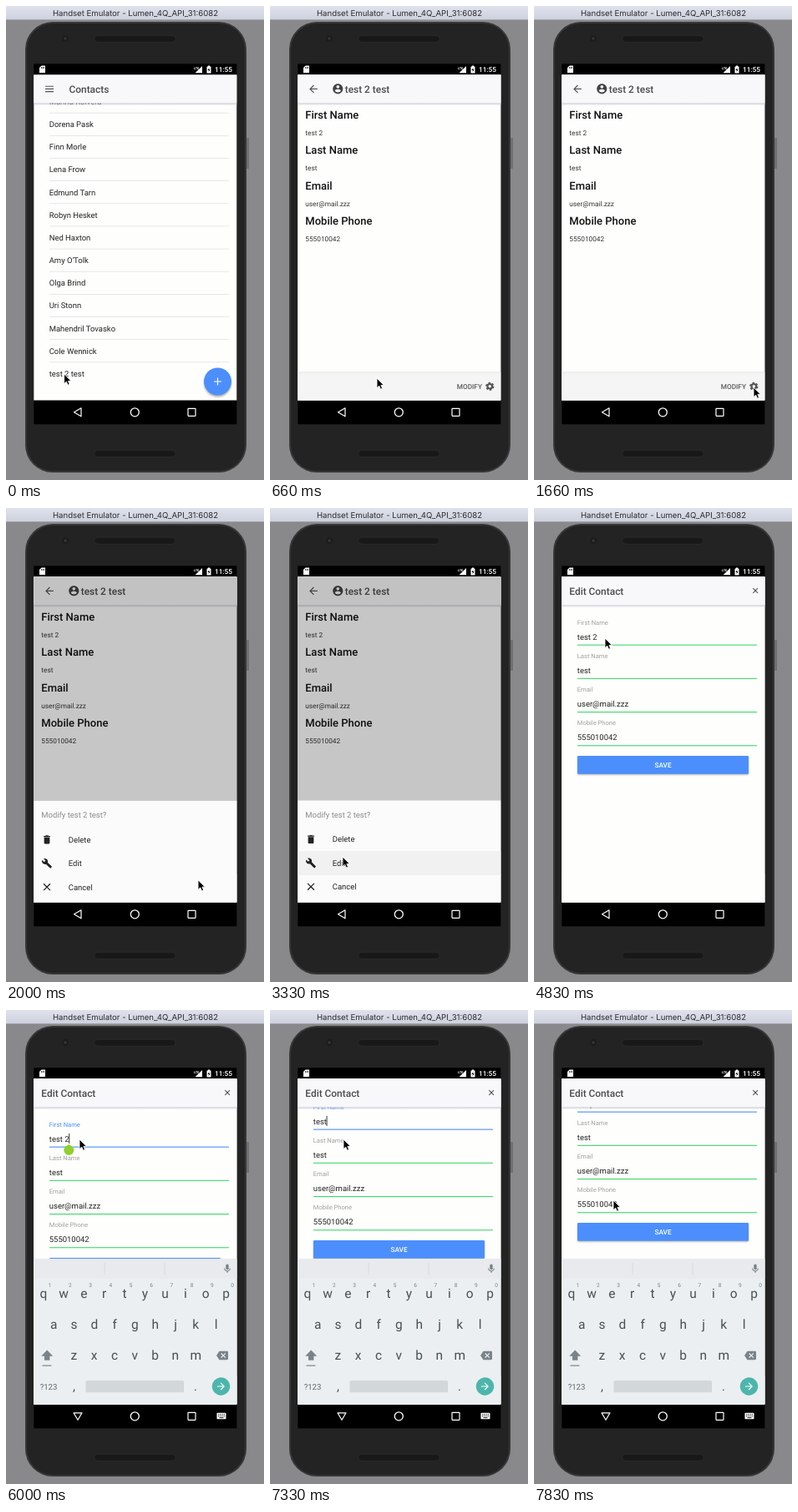
Animation, 309 px wide and 568 px high, one loop 8 s. Source, as an HTML page:

```html
<!DOCTYPE html>
<html lang="en">
<head>
<meta charset="utf-8">
<title>Contact editor</title>
<style>
html, body { margin: 0; width: 100%; height: 100%; overflow: hidden; background: #89898b; }
svg { display: block; }
#stage { width: 309px; height: 568px; }
text { font-family: Roboto, sans-serif; text-rendering: geometricPrecision; }
.bar { font-family: Inter, sans-serif; }
</style>
</head>
<body>
<svg id="stage" viewBox="0 0 309 568">
  <defs>
    <linearGradient id="chrome" x2="0" y2="1"><stop stop-color="#dfe2ec"/><stop offset="1" stop-color="#ced2de"/></linearGradient>
    <linearGradient id="shade" x2="0" y2="1"><stop stop-color="#b9bfcb" stop-opacity=".8"/><stop offset="1" stop-color="#c8ccd6" stop-opacity="0"/></linearGradient>
    <filter id="blur" x="-30%" y="-30%" width="160%" height="160%"><feGaussianBlur stdDeviation="1.3"/></filter>
  </defs>
  <g id="phone"></g>
  <svg x="33.3" y="82.6" width="243" height="390" viewBox="33.3 82.6 243 390">
    <g id="list"></g>
    <g id="detail"></g>
    <rect id="dim" x="33" y="82" width="244" height="391"/>
    <g id="sheet"></g>
    <g id="modal"></g>
    <g id="keys"></g>
  </svg>
  <g id="nav"></g>
  <g id="mouse"><path d="M0 0V11.7L2.7 9.2L4.5 13.2L6.6 12.3L4.9 8.4H8.4Z" stroke="#fff" stroke-width=".9" stroke-linejoin="round"/></g>
</svg>
<script>
const $ = id => document.getElementById(id);
const BLUE = '#4c8ffc', GREEN = '#3cd96b', INK = '#222';

const text = (x, y, s, size, fill = INK, weight = 400, anchor = 'start', more = '') =>
  `<text x="${x}" y="${y}" font-size="${size}" fill="${fill}" font-weight="${weight}" text-anchor="${anchor}" ${more}>${s}</text>`;
const rect = (x, y, w, h, fill, more = '') =>
  `<rect x="${x}" y="${y}" width="${w}" height="${h}" fill="${fill}" ${more}/>`;
const disc = (x, y, r, fill, more = '') => `<circle cx="${x}" cy="${y}" r="${r}" fill="${fill}" ${more}/>`;
const line = (d, color, width, more = '') =>
  `<path d="${d}" fill="none" stroke="${color}" stroke-width="${width}" ${more}/>`;
// 24-unit glyph centred on x, y
const icon = (x, y, size, d, fill, flip = 1) =>
  `<path transform="translate(${x} ${y}) scale(${flip * size / 24} ${size / 24}) translate(-12 -12)" d="${d}" fill="${fill}"/>`;

const BACK = 'M20 11H7.83l5.59-5.59L12 4l-8 8 8 8 1.41-1.41L7.83 13H20v-2z';
const CLOSE = 'M19 6.41L17.59 5 12 10.59 6.41 5 5 6.41 10.59 12 5 17.59 6.41 19 12 13.41 17.59 19 19 17.59 13.41 12z';
const BIN = 'M6 19c0 1.1.9 2 2 2h8c1.1 0 2-.9 2-2V7H6v12zM19 4h-3.5l-1-1h-5l-1 1H5v2h14V4z';
const WRENCH = 'M22.7 19l-9.1-9.1c.9-2.3.4-5-1.5-6.9-2-2-5-2.4-7.4-1.3L9 6 6 9 1.6 4.7C.4 7.1.9 10.1 2.9 12.1c1.9 1.9 4.6 2.4 6.9 1.5l9.1 9.1c.4.4 1 .4 1.4 0l2.3-2.3c.5-.4.5-1.1.1-1.4z';
const PERSON = 'M12 2C6.48 2 2 6.48 2 12s4.48 10 10 10 10-4.48 10-10S17.52 2 12 2zm0 3c1.66 0 3 1.34 3 3s-1.34 3-3 3-3-1.34-3-3 1.34-3 3-3zm0 14.2c-2.5 0-4.71-1.28-6-3.22.03-1.99 4-3.08 6-3.08 1.99 0 5.97 1.09 6 3.08-1.29 1.94-3.5 3.22-6 3.22z';
const ERASE = 'M22 3H7c-.69 0-1.23.35-1.59.88L0 12l5.41 8.11c.36.53.9.89 1.59.89h15c1.1 0 2-.9 2-2V5c0-1.1-.9-2-2-2zm-3 12.59L17.59 17 14 13.41 10.41 17 9 15.59 12.59 12 9 8.41 10.41 7 14 10.59 17.59 7 19 8.41 15.41 12 19 15.59z';
const MIC = 'M12 14c1.66 0 3-1.34 3-3V5c0-1.66-1.34-3-3-3S9 3.34 9 5v6c0 1.66 1.34 3 3 3zm5-3c0 2.8-2.2 5-5 5s-5-2.2-5-5H5c0 3.4 2.7 6.2 6 6.7V21h2v-3.3c3.3-.5 6-3.3 6-6.7h-2z';

const wide = (y, h, fill, more) => rect(33, y, 244, h, fill, more);
const header = (x, title) =>
  wide(82, 34.4, '#f8f8fa') + wide(116.4, 3, 'url(#shade)') +
  text(x, 103.8, title, 11.9, '#4a4a4a', 500);
const page = () => wide(82, 391, '#fefefd');

const slot = y => rect(106, y, 97, 8, '#181819', 'rx="4" stroke="#323234" stroke-width=".6"');
$('phone').innerHTML =
  rect(0, 0, 309, 568, '#89898b') +
  rect(0, 0, 309, 16, 'url(#chrome)') + rect(0, 16, 309, 1, '#a2a2a6') +
  text(155, 11.9, 'Handset Emulator - Lumen_4Q_API_31:6082', 9.6, '#2c2c30', 400, 'middle', 'class="bar"') +
  rect(287, 158, 4, 37, '#6e6e71', 'rx="1"') +
  rect(23, 19, 265, 540, '#363637', 'rx="33"') +
  rect(25, 21, 261, 536, '#232323', 'rx="31"') +
  slot(35.3) + slot(532.3) +
  disc(71, 39, 4, '#1c1c1e') + disc(71, 39, 1.8, '#34353d') +
  rect(33.3, 69.3, 243, 432, '#000') +
  `<path d="M42.5 71.5H47V80H40V74Z" fill="#fff"/>` + line('M42.6 73v2M44.1 73v2M45.6 73v2', '#000', .7) +
  text(225, 75.5, 'LTE', 3.8, '#fff', 700) +
  `<path d="M235 72V80.3H226.5Z" fill="#fff"/>` +
  rect(240.5, 72.5, 5, 8, '#fff', 'rx=".6"') + rect(241.8, 71.5, 2.4, 1.5, '#fff') +
  `<path d="M243.6 73.6L241.6 77H243L242.4 79.6L244.5 76H243.1Z"/>` +
  text(271, 79, '11:55', 8.3, '#fff', 500, 'end');

const people = ['Marina Kolvera', 'Dorena Pask', 'Finn Morle', 'Lena Frow', 'Edmund Tarn', 'Robyn Hesket',
  'Ned Haxton', "Amy O'Tolk", 'Olga Brind', 'Uri Stonn', 'Mahendril Tovasko', 'Cole Wennick', 'test 2 test'];
$('list').innerHTML = page() +
  people.map((name, i) => {
    const y = 118 + i * 27.15;
    return text(51.7, y, name, 9.46) + (i < 12 ? rect(52, y + 9.8, 215, .7, '#dedede') : '');
  }).join('') +
  header(75.5, 'Contacts') +
  line('M47 96.2h10M47 99.4h10M47 102.6h10', '#555', 1.1) +
  disc(253.5, 452, 16.5, '#000', 'opacity=".3" filter="url(#blur)"') +
  disc(253.5, 450, 16.5, BLUE) + line('M249 450h9M253.5 445.5v9', '#fff', 1.2);

const fields = [['First Name', 'test 2'], ['Last Name', 'test'], ['Email', 'user@mail.zzz'], ['Mobile Phone', '555010042']];
$('detail').innerHTML = page() + '<g id="info">' +
  fields.map(([label, value], i) =>
    text(42.3, 134.9 + i * 42.5, label, 13, '#111', 500) +
    text(42.3, 154.5 + i * 42.5, value, 8.27, '#333')).join('') +
  header(89.7, 'test 2 test') +
  icon(52, 99.4, 14.5, BACK, '#555') + icon(81.3, 99.2, 14.5, PERSON, '#424242') + '</g>' +
  wide(439, 34, '#f5f5f5') + wide(438.5, .8, '#e2e2e2') +
  text(223.7, 458.8, 'MODIFY', 8.27, '#5c5c5c', 500) +
  disc(263.3, 455.8, 2.8, 'none', 'stroke="#555" stroke-width="2.1"') +
  disc(263.3, 455.8, 4.3, 'none', 'stroke="#555" stroke-width="1.7" stroke-dasharray="2.4 2.1"');

const choices = [['Delete', BIN, 13.5], ['Edit', WRENCH, 13], ['Cancel', CLOSE, 15]];
$('sheet').innerHTML = wide(350.5, 123, '#fbfbfc') +
  wide(411, 29, '#f1f1f2', 'id="press"') +
  text(42.3, 370.5, 'Modify test 2 test?', 9.46, '#8b8b8b') +
  choices.map(([label, d, size], i) =>
    icon(49, 397 + i * 28.4, size, d, INK) + text(74.8, 400.4 + i * 28.4, label, 9.46)).join('');

$('modal').innerHTML = page() + '<g id="form">' +
  fields.map(([label, value], i) => {
    const y = i * 40.2, id = i ? '' : 'id="value"';
    return text(51.8, 139.7 + y, label, 7.57, '#a0a0a0', 400, 'start', i ? '' : 'id="label"') +
      text(51.8, 157.5 + y, value, 9.46, INK, 400, 'start', id) +
      rect(52, 163.6 + y, 215, 1.1, GREEN, i ? '' : 'id="rule"');
  }).join('') +
  rect(52, 298.3, 205, 21.5, '#000', 'rx="1" opacity=".3" filter="url(#blur)"') +
  rect(52, 297, 205, 21.7, BLUE, 'rx="1.2"') +
  text(154.5, 310.8, 'SAVE', 8.27, '#fff', 500, 'middle') +
  rect(0, 148, .9, 12, '#222', 'id="caret"') +
  `<path id="grip" d="M75.3 161L79.6 163.7A6 6 0 1 1 71 163.7Z" fill="#8ed02c"/></g>` +
  header(42.3, 'Edit Contact') + icon(265.2, 99, 11, CLOSE, '#444');

const KEY = '#455056', SOFT = '#78848a';
const keyRow = (letters, x, y) => [...letters].map((c, i) =>
  text(x + i * 24.3, y, c, 15.5, KEY, 400, 'middle')).join('');
$('keys').innerHTML = wide(298, 175, '#eceff1') + wide(298, 23.5, '#e8eaed') +
  rect(117.7, 303, .8, 14, '#d3d7da') + rect(189.7, 303, .8, 14, '#d3d7da') +
  icon(265, 310, 13.5, MIC, SOFT) +
  keyRow('qwertyuiop', 44.8, 345) + keyRow('asdfghjkl', 57.2, 382) + keyRow('zxcvbnm', 81.4, 419) +
  [...'1234567890'].map((c, i) => text(52.5 + i * 24.3, 332, c, 6.6, SOFT, 400, 'middle')).join('') +
  `<path d="M49.2 407.5L56.2 414.8H52.4V419.7H46V414.8H42.2Z" fill="${SOFT}"/>` + rect(43.5, 425.5, 11, 1.2, SOFT) +
  icon(259, 414, 14, ERASE, SOFT) +
  text(51, 454.5, '?123', 9.6, '#5c686e', 400, 'middle') + text(81.4, 456, ',', 15, KEY, 400, 'middle') +
  rect(95.5, 444, 117.5, 14.3, '#d2d7da', 'rx="1.5"') + text(227, 456, '.', 15, KEY, 400, 'middle') +
  disc(257.5, 451, 10.7, '#4db6ac') + icon(257.5, 451, 13.5, BACK, '#fff', -1);

$('nav').innerHTML =
  line('M81.5 486.8L90 481.8V491.8Z', '#fff', 1.2, 'id="back" stroke-linejoin="round"') +
  disc(154.3, 486.8, 5, 'none', 'stroke="#fff" stroke-width="1.3"') +
  rect(218, 482.3, 9, 9, 'none', 'stroke="#fff" stroke-width="1.2" rx=".5"') +
  '<g id="board">' + rect(252.5, 482.7, 11, 7.6, '#fff', 'rx=".8"') +
  line('M254 484.6h8M254 486.5h8', '#000', .9, 'stroke-dasharray="1 .75"') + line('M255.5 488.6h5', '#000', .9) + '</g>';

const ratio = (t, a, b) => Math.min(1, Math.max(0, (t - a) / (b - a)));
const easeOut = (t, a, b) => 1 - (1 - ratio(t, a, b)) ** 3;
const show = (id, on) => $(id).style.display = on ? '' : 'none';
const shift = (id, x, y) => $(id).setAttribute('transform', `translate(${x} ${y})`);

// time, x, y of the pointer tip
const path = [[330, 69.6, 441], [660, 128, 446], [1160, 246, 465], [1330, 263, 457], [1830, 263, 457],
  [2660, 102, 402], [3000, 87, 418], [3500, 87, 418], [4000, 73, 175], [4500, 74, 174],
  [4830, 85, 156], [5330, 88, 155], [7330, 88, 155], [7830, 95, 228]];
function pointer(t) {
  const i = path.findIndex(p => p[0] > t);
  if (i === 0) return path[0].slice(1);
  if (i < 0) return path[path.length - 1].slice(1);
  const a = path[i - 1], b = path[i], k = ratio(t, a[0], b[0]);
  return [a[1] + (b[1] - a[1]) * k, a[2] + (b[2] - a[2]) * k];
}

function rise(id, p) {
  show(id, p > 0);
  $(id).style.opacity = p * p;
  shift(id, 0, 40 * (1 - p));
}

function draw(t) {
  const edit = easeOut(t, 3858, 4138);
  rise('detail', easeOut(t, 100, 460));
  rise('modal', edit);
  $('info').style.opacity = 1 - .7 * edit;

  const open = easeOut(t, 1660, 2060) - ratio(t, 3340, 3640);
  show('sheet', open > 0);
  shift('sheet', 0, 122 * (1 - open));
  show('press', t >= 3330);
  $('dim').style.opacity = .22 * Math.max(0, open);

  const focus = t >= 5000, typing = t >= 5160;
  $('label').setAttribute('fill', focus ? BLUE : '#a0a0a0');
  $('rule').setAttribute('fill', focus ? BLUE : GREEN);
  $('value').textContent = t < 6160 ? 'test 2' : 'test';
  $('caret').setAttribute('x', t < 6160 ? 75.3 : t < 6330 ? 70 : 67.6);
  show('caret', focus && !(t >= 5500 && t < 6000) && !(t >= 6830 && t < 7330));
  show('grip', t >= 5330 && t < 6160);
  shift('form', 0, -42 * ratio(t, 7080, 7580));

  show('keys', typing);
  shift('keys', 0, 174 * (1 - easeOut(t, 5060, 5320)));
  show('board', typing);
  $('back').setAttribute('transform', typing ? 'rotate(-90 86 486.8)' : '');

  shift('mouse', ...pointer(t));
}

function tick() {
  const step = Math.min(47, Math.floor((performance.now() % 8000 + 7) * .006));
  draw(Math.floor(step * 100 / 6) * 10);
  requestAnimationFrame(tick);
}
tick();
</script>
</body>
</html>
```
